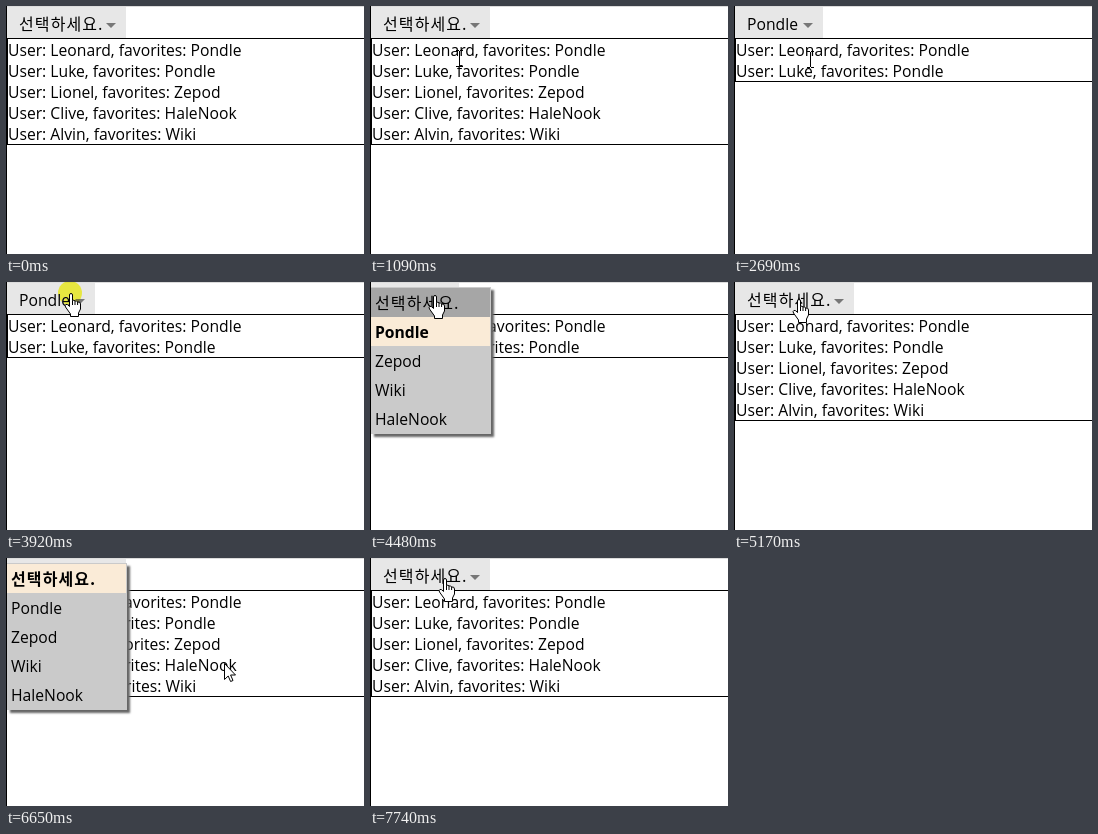
Recreate the animation shown at these times as an HTML page with a canvas. Size 358 by 248 pixels, loop 8000 ms.

```html
<!DOCTYPE html>
<html lang="ko">
<head>
<meta charset="utf-8">
<title>Dropdown filter</title>
<style>
html, body { margin: 0; width: 100%; height: 100%; overflow: hidden; background: #fff; }
canvas { display: block; width: 358px; height: 248px; }
</style>
</head>
<body>
<canvas id="stage"></canvas>
<script>
const W = 358, H = 248, LOOP = 8000;
const canvas = document.getElementById('stage');
const ctx = canvas.getContext('2d');
const dpr = window.devicePixelRatio || 1;
canvas.width = W * dpr;
canvas.height = H * dpr;

const PROMPT = '선택하세요.';
const OPTIONS = [PROMPT, 'Pondle', 'Zepod', 'Wiki', 'HaleNook'];
const USERS = [
  ['Leonard', 'Pondle'],
  ['Luke', 'Pondle'],
  ['Lionel', 'Zepod'],
  ['Clive', 'HaleNook'],
  ['Alvin', 'Wiki']
];
const LATIN = { font: '15.7px "Open Sans", "Noto Sans", sans-serif', weight: 400, spacing: '0px' };
const HANGUL = { font: '16px "Noto Sans CJK KR", "Noto Sans CJK", sans-serif', weight: 300, spacing: '1.1px' };

// Time spans in ms
const OPEN = [[1710, 2610], [4010, 5170], [6100, 7200]];
const FILTERED = [[2610, 5170]];
const CLICKS = [[1540, 1710], [2380, 2610], [3920, 4010], [5090, 5170], [5950, 6100], [7050, 7200]];

// Pointer moves: start, end, steps, x, y
const ENTRY = { x: 328, y: 238 }, ENTRY_TIME = 610;
const MOVES = [
  [610, 1230, 8, 45, 17],
  [1710, 2306, 8, 76, 52],
  [2610, 2690, 1, 76, 53],
  [2690, 3370, 9, 64, 10],
  [3540, 3540, 1, 64, 11],
  [4480, 4480, 1, 64, 13],
  [4860, 4860, 1, 64, 17],
  [5510, 5630, 2, 64, 10],
  [6100, 6650, 7, 218, 105],
  [7200, 7740, 7, 74, 20]
];

const ROW = 29, MENU_TOP = 6, MENU_WIDTH = 119;
const HAND = new Path2D('M6.5 13.5V2Q6.5.5 8 .5T9.5 2V7.5Q11.2 6.5 12 8Q13.8 7.3 14.6 9Q17.5 8.5 17.5 11V16L15.5 20V23.5H7.5V21L2.5 14Q1.5 12 3 11.4Q4.6 11 6.5 13.5Z');
const KNUCKLES = new Path2D('M9.5 7.5V12M12 8V12M14.6 9V12');
const ARROW = new Path2D('M.5.5V16.5L4.2 13L6.6 18.5L9 17.5L6.6 12H11.5Z');

const within = (spans, t) => spans.some(([a, b]) => t >= a && t < b);
const ease = u => u * u * (3 - 2 * u);

function pointerAt(t) {
  let { x, y } = ENTRY;
  for (const [start, end, steps, toX, toY] of MOVES) {
    if (t < start) break;
    const u = t >= end ? 1 : Math.floor((t - start) / (end - start) * steps + 0.01) / steps;
    x += (toX - x) * ease(u);
    y += (toY - y) * ease(u);
  }
  return { x: Math.round(x), y: Math.round(y) };
}

function rect(x, y, w, h, color) {
  ctx.fillStyle = color;
  ctx.fillRect(x, y, w, h);
}

function text(str, x, y, bold) {
  const face = str === PROMPT ? HANGUL : LATIN;
  ctx.font = `${bold ? 700 : face.weight} ${face.font}`;
  ctx.letterSpacing = face.spacing;
  ctx.fillStyle = '#000';
  ctx.fillText(str, x, y);
}

function drawButton(label, width) {
  rect(1, 1, width - 1, 31, '#e7e7e7');
  text(label, 13, 24);
  const x = width - 20;
  ctx.fillStyle = '#777';
  ctx.beginPath();
  ctx.moveTo(x, 17);
  ctx.lineTo(x + 10, 17);
  ctx.lineTo(x + 5, 22);
  ctx.fill();
}

function drawList(users) {
  const h = users.length * 21 + 2;
  ctx.strokeStyle = '#000';
  ctx.lineWidth = 1;
  ctx.strokeRect(1.5, 32.5, W + 10, h - 1);
  users.forEach(([name, site], i) => text(`User: ${name}, favorites: ${site}`, 2, 50 + i * 21));
}

function drawMenu(selected, hovered) {
  ctx.save();
  ctx.beginPath();
  ctx.rect(1, 0, W, H);
  ctx.clip();
  ctx.shadowColor = '#666';
  ctx.shadowBlur = 2 * dpr;
  ctx.shadowOffsetX = ctx.shadowOffsetY = 3 * dpr;
  rect(1, 5, MENU_WIDTH + 1, 147, '#cacaca');
  ctx.restore();
  OPTIONS.forEach((option, i) => {
    const y = MENU_TOP + i * ROW;
    if (i === hovered) rect(1, y, MENU_WIDTH, ROW, '#a6a6a6');
    else if (i === selected) rect(1, y, MENU_WIDTH, ROW, '#faebd7');
    text(option, 5, y + 21, i === selected);
  });
}

function drawClick({ x, y }) {
  ctx.save();
  ctx.globalCompositeOperation = 'darken';
  ctx.fillStyle = '#f2ea40';
  ctx.beginPath();
  ctx.arc(x, y, 12, 0, Math.PI * 2);
  ctx.fill();
  ctx.restore();
}

function drawPointer(kind, { x, y }) {
  ctx.save();
  ctx.lineWidth = 1;
  ctx.strokeStyle = '#000';
  ctx.fillStyle = '#fff';
  if (kind === 'beam') {
    rect(x, y - 7, 1, 15, '#000');
    for (const top of [y - 8, y + 8]) {
      rect(x - 3, top, 3, 1, '#000');
      rect(x + 1, top, 3, 1, '#000');
    }
  } else {
    ctx.translate(kind === 'hand' ? x - 7 : x, y);
    const shape = kind === 'hand' ? HAND : ARROW;
    ctx.fill(shape);
    ctx.stroke(shape);
    if (kind === 'hand') ctx.stroke(KNUCKLES);
  }
  ctx.restore();
}

function draw(t) {
  const open = within(OPEN, t);
  const selected = within(FILTERED, t) ? 1 : 0;
  const users = selected ? USERS.filter(u => u[1] === OPTIONS[selected]) : USERS;
  const buttonWidth = selected ? 89 : 120;
  const p = pointerAt(t);

  ctx.setTransform(dpr, 0, 0, dpr, 0, 0);
  rect(0, 0, W, H, '#fff');
  rect(0, 0, W, 1, '#dcdcdc');
  drawButton(OPTIONS[selected], buttonWidth);
  drawList(users);
  rect(0, 0, 1, H, '#000');

  const row = Math.floor((p.y - MENU_TOP) / ROW);
  const inMenu = open && p.x <= MENU_WIDTH && row >= 0 && row < OPTIONS.length;
  if (open) drawMenu(selected, inMenu ? row : -1);
  if (t < ENTRY_TIME) return;

  const onButton = !open && p.y < 32 && p.x < buttonWidth;
  const onText = !open && p.y > 32 && p.y < 33 + users.length * 21 && p.x < 236;
  if (within(CLICKS, t)) drawClick(p);
  drawPointer(inMenu || onButton ? 'hand' : onText ? 'beam' : 'arrow', p);
}

const began = performance.now();
function tick() {
  draw((performance.now() - began) % LOOP);
  requestAnimationFrame(tick);
}
tick();
</script>
</body>
</html>
```
